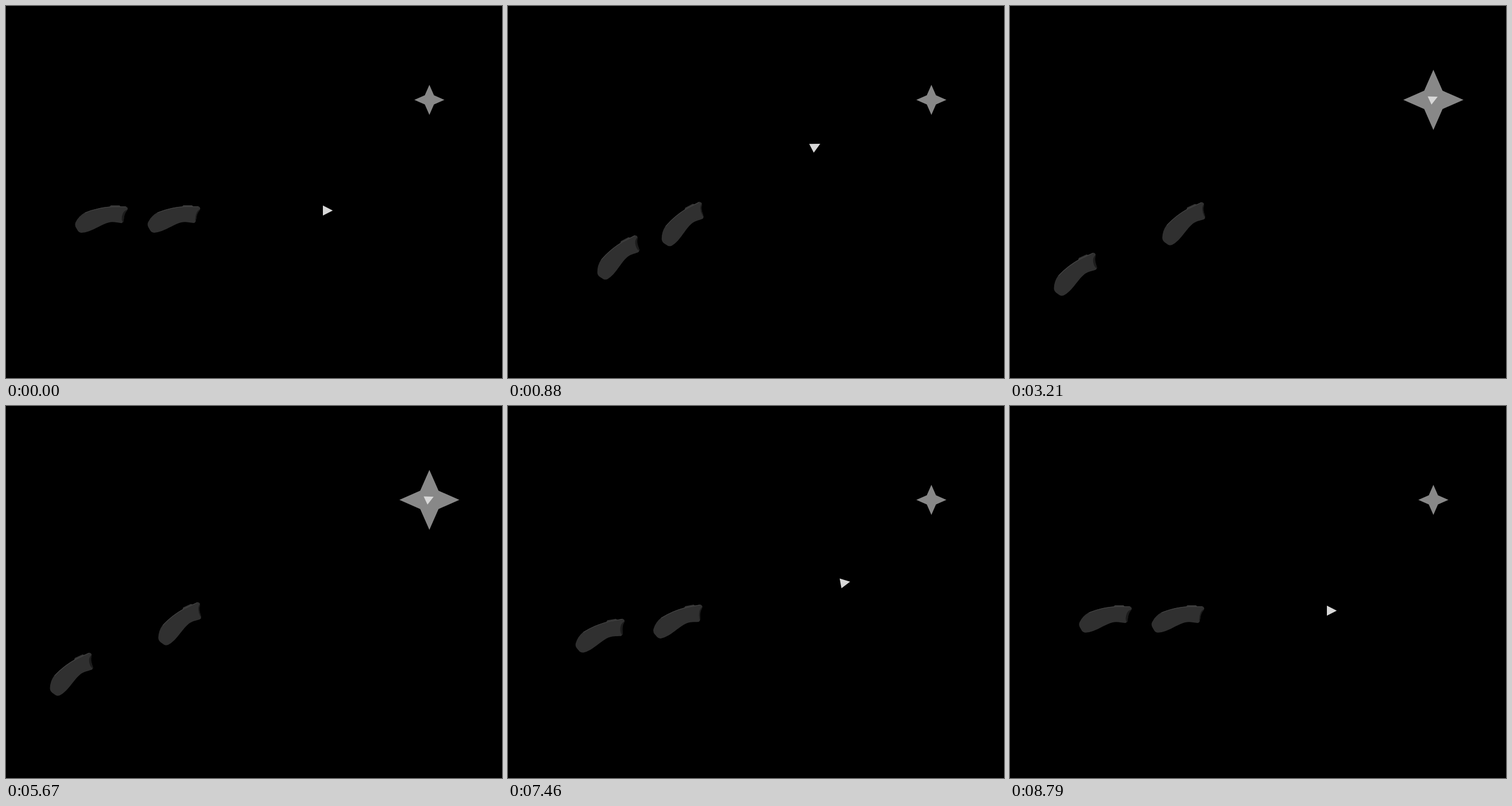
An HTML page for the animation above (9.62 s loop, 864 by 648 pixels).

```html
<!DOCTYPE html>
<html lang="en">
<head>
<meta charset="utf-8">
<title>Aim and reach</title>
<style>
  html, body { margin: 0; height: 100%; overflow: hidden; background: #000; }
  svg { display: block; width: 864px; height: 648px; }
</style>
</head>
<body>
<svg viewBox="0 0 864 648">
  <defs>
    <g id="grip">
      <path fill="#363636" d="M306 350L309 347H324L327 350Z"/>
      <path fill="#303030" d="M335 349Q338.500 350 338.300 353.500Q337.500 356 334.500 359Q332 363 331.500 370Q330.500 378 327 378C319 377 312 375 305 377C294 380 282 388 271 392Q264 394.500 258 394.800Q253.500 394.500 251.500 391.500L248 385.500Q245.500 381 247.500 376.500Q253 365.500 263 360C277 354 294 350 310 349Z"/>
      <path fill="none" stroke="#464646" d="M264 360C280 353.500 296 350.300 312 349.600L335 349.500"/>
    </g>
  </defs>
  <path id="star" fill="#888" d="M0 -26.200L8 -8L26.200 0L8 8L0 26.200L-8 8L-26.200 0L-8 -8Z"/>
  <g id="rig">
    <g id="rear">
      <use href="#grip"/>
      <path fill="#1c1c1c" d="M338 354.500Q334 355 331 359Q327.500 365 328 372Q328.500 376 331 376.500Q331.500 366 334.500 360Z"/>
    </g>
    <use href="#grip"/>
    <path fill="#1c1c1c" d="M338.300 354Q335 354.500 332 360Q329.500 366 329.500 373L330.500 376Q331.500 366 334.500 360Z"/>
    <path id="tip" fill="#d8d8d8" d="M-5.700 -8.700L11.500 0L-5.700 8.700Z"/>
  </g>
</svg>
<script>
const LOOP = 9620;
const el = id => document.getElementById(id);
const [star, rig, rear, tip] = ['star', 'rig', 'rear', 'tip'].map(el);

const span = (t, start, length) => Math.min(1, Math.max(0, (t - start) / length));
const sine = p => (1 - Math.cos(Math.PI * p)) / 2;
const backOut = p => 1 + 2.70158 * (p - 1) ** 3 + 1.70158 * (p - 1) ** 2;

function draw(now) {
  const t = now % LOOP;
  const turn = backOut(span(t, 0, 1600)) - backOut(span(t, 7212, 1600));
  const reach = sine(span(t, 2440, 600)) - sine(span(t, 5645, 2400));
  const glow = sine(span(t, 3000, 215)) - sine(span(t, 5650, 400));

  rig.setAttribute('transform', `rotate(${-25 * turn} 318 350)`);
  rear.setAttribute('transform', `translate(${-126.3 - 82 * reach})`);
  tip.setAttribute('transform', `translate(${557.7 + 218 * reach} 356.500) scale(${1 - 0.1 * reach})`);
  star.setAttribute('transform', `translate(737.500 163.500) scale(${1 + glow})`);
  requestAnimationFrame(draw);
}
draw(0);
</script>
</body>
</html>
```
